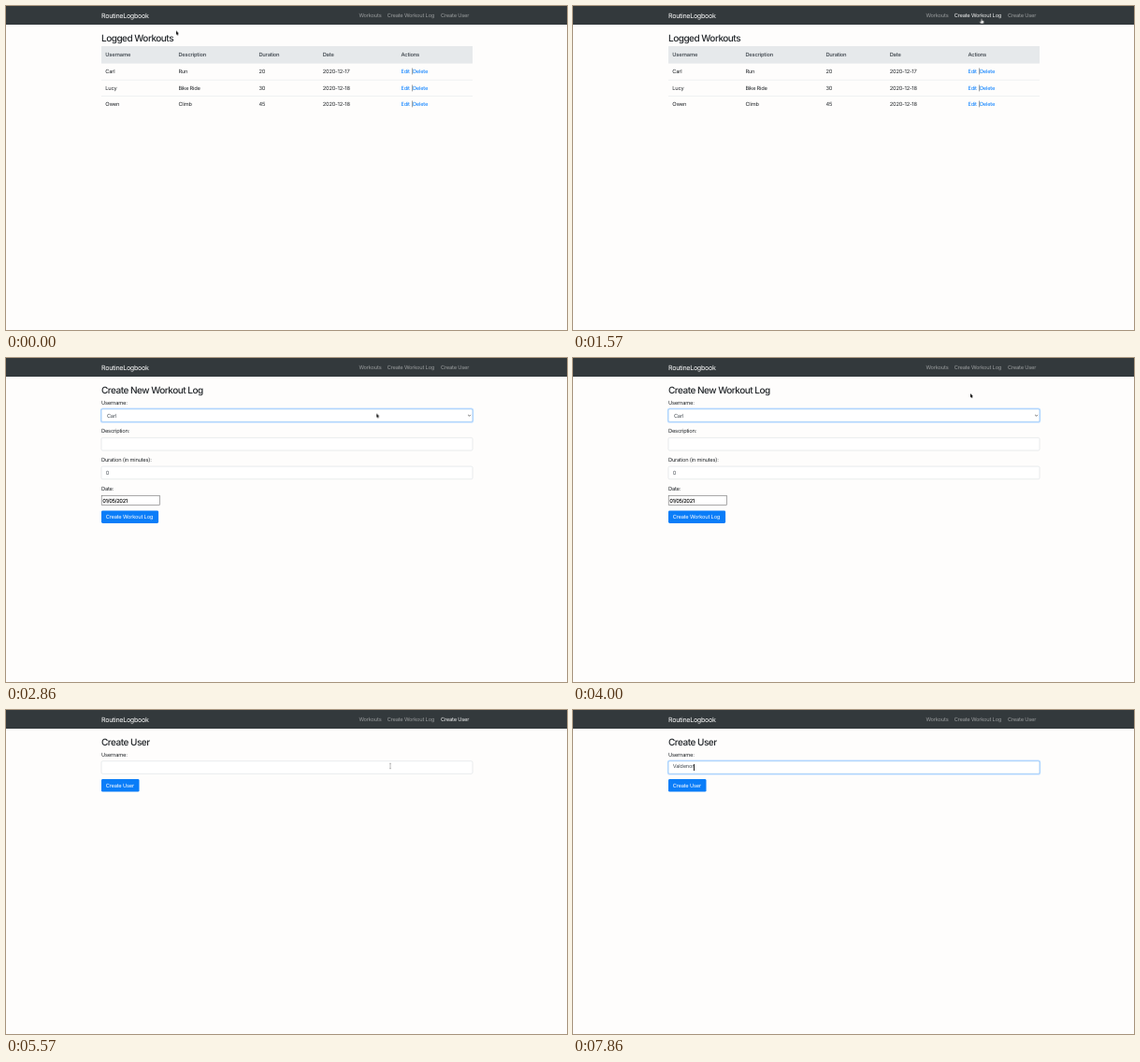
These frames come from a looping animation (600x347 px, 8000 ms). An HTML page:

```html
<!DOCTYPE html>
<html lang="en">
<head>
<meta charset="utf-8">
<title>Workout log</title>
<style>
  html, body { margin: 0; width: 100%; height: 100%; overflow: hidden; background: #fefdfc; }
  svg { position: absolute; inset: 0; width: 100%; height: 100%; }
  text, .typed {
    font: 400 5.72px Inter, "Open Sans", sans-serif;
    letter-spacing: -.035em;
    text-rendering: geometricPrecision;
    white-space: pre;
  }
  text { fill: #212529; }
  .brand { font-size: 7.15px; fill: #fff; letter-spacing: -.045em; }
  .nav { fill: #999c9d; }
  .title { font-size: 10px; font-weight: 500; letter-spacing: -.05em; }
  .head text { font-weight: 600; fill: #495057; }
  .link { fill: #007bff; }
  .value { fill: #495057; }
  .date { fill: #000; font-weight: 500; letter-spacing: -.07em; }
  .btn rect { fill: #0a7df8; }
  .btn text { fill: #fff; }
  .rule { fill: #dee2e6; }
  .field { fill: #fff; stroke: #ced4da; stroke-width: .45; }
  .ring rect { fill: none; }
  .glow { stroke: #bfdeff; stroke-width: 1.14; }
  .edge { stroke: #80bdff; stroke-width: .45; }

  /* 56 ticks per loop */
  .a { animation: 8s step-end -3ms infinite; }
  .list { animation-name: list; }
  .log { animation-name: log; }
  .user { animation-name: user; }
  .navLog { animation-name: navLog; }
  .navUser { animation-name: navUser; }
  .ringLog { animation-name: ringLog; }
  .ringUser, .typed { animation-name: ringUser; }
  .arrow { animation-name: arrow; }
  .hand { animation-name: hand; }
  .beam { animation-name: beam; }
  .pointer { animation-name: move; }

  @keyframes list { 0% { opacity: 1 } 21.4286%, 100% { opacity: 0 } }
  @keyframes log { 0% { opacity: 0 } 21.4286% { opacity: 1 } 64.2857%, 100% { opacity: 0 } }
  @keyframes user { 0% { opacity: 0 } 64.2857%, 100% { opacity: 1 } }
  @keyframes navLog { 0% { fill: #999c9d } 16.0714% { fill: #f0f1f1 } 32.1429%, 100% { fill: #999c9d } }
  @keyframes navUser { 0% { fill: #999c9d } 58.9286% { fill: #f0f1f1 } 73.2143%, 100% { fill: #999c9d } }
  @keyframes ringLog { 0% { opacity: 0 } 32.1429%, 100% { opacity: 1 } }
  @keyframes ringUser { 0% { opacity: 0 } 73.2143%, 100% { opacity: 1 } }
  @keyframes arrow {
    0% { opacity: 1 } 16.0714% { opacity: 0 } 25% { opacity: 1 }
    58.9286% { opacity: 0 } 67.8571% { opacity: 1 } 69.6429%, 100% { opacity: 0 }
  }
  @keyframes hand {
    0% { opacity: 0 } 16.0714% { opacity: 1 } 25% { opacity: 0 }
    58.9286% { opacity: 1 } 67.8571%, 100% { opacity: 0 }
  }
  @keyframes beam { 0% { opacity: 0 } 69.6429% { opacity: 1 } 91.0714%, 100% { opacity: 0 } }
  @keyframes move {
    0% { transform: translate(182px, 26.5px); animation-timing-function: steps(4) }
    7.1429% { transform: translate(443px, 84.5px) }
    8.9286% { transform: translate(443px, 84.5px); animation-timing-function: steps(4) }
    16.0714% { transform: translate(436.5px, 13.7px) }
    23.2143% { transform: translate(436.5px, 13.7px); animation-timing-function: steps(2) }
    26.7857% { transform: translate(400.3px, 54.8px); animation-timing-function: steps(5) }
    35.7143% { transform: translate(396.3px, 59.4px) }
    39.2857% { transform: translate(396.3px, 59.4px); animation-timing-function: steps(4) }
    46.4286% { transform: translate(425px, 38px) }
    51.7857% { transform: translate(425px, 38px); animation-timing-function: steps(4) }
    58.9286% { transform: translate(478px, 12.2px) }
    66.0714% { transform: translate(478px, 12.2px); animation-timing-function: steps(2) }
    69.6429%, 100% { transform: translate(411px, 60px) }
  }

  .typed {
    position: absolute; left: 106.7px; top: 57.2px; height: 8.5px;
    line-height: 8.5px; color: #495057;
  }
  .typed::before { content: ""; animation-name: type; }
  .typed::after {
    content: ""; position: absolute; right: -.4px; top: 1.2px;
    width: .5px; height: 6.2px; background: #222;
  }
  @keyframes type {
    0% { content: "" }
    80.3571% { content: "V" }
    82.1429% { content: "Va" }
    85.7143% { content: "Val" }
    91.0714% { content: "Vald" }
    92.8571% { content: "Valde" }
    94.6429% { content: "Valden" }
    96.4286% { content: "Valdeno" }
    98.2143%, 100% { content: "Valdenor" }
  }
  .typed::before { animation: type 8s step-end -3ms infinite; }
</style>
</head>
<body>
<svg viewBox="0 0 600 347" preserveAspectRatio="none">
  <defs>
    <rect id="box" x="102" y="54.7" width="397" height="13.6" rx="1.43"/>
    <g id="ring" class="ring">
      <rect class="glow" x="101.4" y="54.1" width="398.2" height="14.8" rx="2"/>
      <use href="#box" class="edge" fill="none"/>
    </g>
  </defs>

  <rect width="600" height="20" fill="#33393c"/>
  <text class="brand" x="102" y="12.6">RoutineLogbook</text>
  <text class="nav" x="377.4" y="12.2">Workouts</text>
  <text class="nav a navLog" x="407.7" y="12.2">Create Workout Log</text>
  <text class="nav a navUser" x="465" y="12.2">Create User</text>

  <g class="a list">
    <text class="title" x="102" y="38.3">Logged Workouts</text>
    <rect x="102" y="43" width="397" height="18.6" fill="#e6e9eb"/>
    <g class="head">
      <text x="106.3" y="54.3">Username</text>
      <text x="184.4" y="54.3">Description</text>
      <text x="270.4" y="54.3">Duration</text>
      <text x="338.7" y="54.3">Date</text>
      <text x="422.4" y="54.3">Actions</text>
    </g>
    <rect class="rule" x="102" y="78.9" width="397" height=".45"/>
    <rect class="rule" x="102" y="96.4" width="397" height=".45"/>
    <g>
      <text x="106.3" y="72.3">Carl</text>
      <text x="184.4" y="72.3">Run</text>
      <text x="270.4" y="72.3">20</text>
      <text x="338.7" y="72.3">2020-12-17</text>
      <text x="422.4" y="72.3"><tspan class="link">Edit</tspan> |<tspan class="link">Delete</tspan></text>
    </g>
    <g transform="translate(0 17.5)">
      <text x="106.3" y="72.3">Lucy</text>
      <text x="184.4" y="72.3">Bike Ride</text>
      <text x="270.4" y="72.3">30</text>
      <text x="338.7" y="72.3">2020-12-18</text>
      <text x="422.4" y="72.3"><tspan class="link">Edit</tspan> |<tspan class="link">Delete</tspan></text>
    </g>
    <g transform="translate(0 35)">
      <text x="106.3" y="72.3">Owen</text>
      <text x="184.4" y="72.3">Climb</text>
      <text x="270.4" y="72.3">45</text>
      <text x="338.7" y="72.3">2020-12-18</text>
      <text x="422.4" y="72.3"><tspan class="link">Edit</tspan> |<tspan class="link">Delete</tspan></text>
    </g>
  </g>

  <g class="a log">
    <text class="title" x="102" y="38.3">Create New Workout Log</text>
    <text x="102" y="49.7">Username:</text>
    <use href="#box" class="field"/>
    <g class="a ringLog"><use href="#ring"/></g>
    <text class="value" x="107.9" y="63.6">Carl</text>
    <path d="M494.2 60.9l1.3 1.3 1.3-1.3" fill="none" stroke="#333" stroke-width=".75"/>
    <text x="102" y="80.4">Description:</text>
    <use href="#box" class="field" y="30.7"/>
    <text x="102" y="111.1">Duration (in minutes):</text>
    <use href="#box" class="field" y="61.4"/>
    <text class="value" x="106.7" y="125.1">0</text>
    <text x="102" y="141.9">Date:</text>
    <rect x="102.2" y="147.4" width="62.3" height="10" fill="#fff" stroke="#6f6f6f" stroke-width=".6"/>
    <text class="date" x="103.2" y="154.5">01/05/2021</text>
    <g class="btn">
      <rect x="102" y="163.4" width="61.1" height="13.6" rx="1.43"/>
      <text x="106.7" y="172.3">Create Workout Log</text>
    </g>
  </g>

  <g class="a user">
    <text class="title" x="102" y="38.3">Create User</text>
    <text x="102" y="49.7">Username:</text>
    <use href="#box" class="field"/>
    <g class="a ringUser"><use href="#ring"/></g>
    <g class="btn">
      <rect x="102" y="74" width="40.5" height="13.6" rx="1.43"/>
      <text x="106.7" y="82.9">Create User</text>
    </g>
  </g>
</svg>

<div class="typed a"></div>

<svg viewBox="0 0 600 347" preserveAspectRatio="none">
  <g class="a pointer">
    <path class="a arrow" d="M0 0V4.4L1 3.5 1.7 5.1 2.4 4.8 1.7 3.2H3.1Z"
      fill="#111" stroke="#fff" stroke-width=".45" paint-order="stroke"/>
    <path class="a hand" d="M0 0Q.5-.4.9 0V1.7L2.7 2.2Q3.1 2.4 3 3L2.5 5H-.4L-1.7 3.1Q-1.6 2.5-1 2.7L0 3.3Z"
      fill="#fff" stroke="#222" stroke-width=".3"/>
    <path class="a beam" d="M-.9-2.9Q0-2.9 0-2.2V2.2Q0 2.9-.9 2.9M.9-2.9Q0-2.9 0-2.2M0 2.2Q0 2.9.9 2.9"
      fill="none" stroke="#777" stroke-width=".5"/>
  </g>
</svg>
</body>
</html>
```
